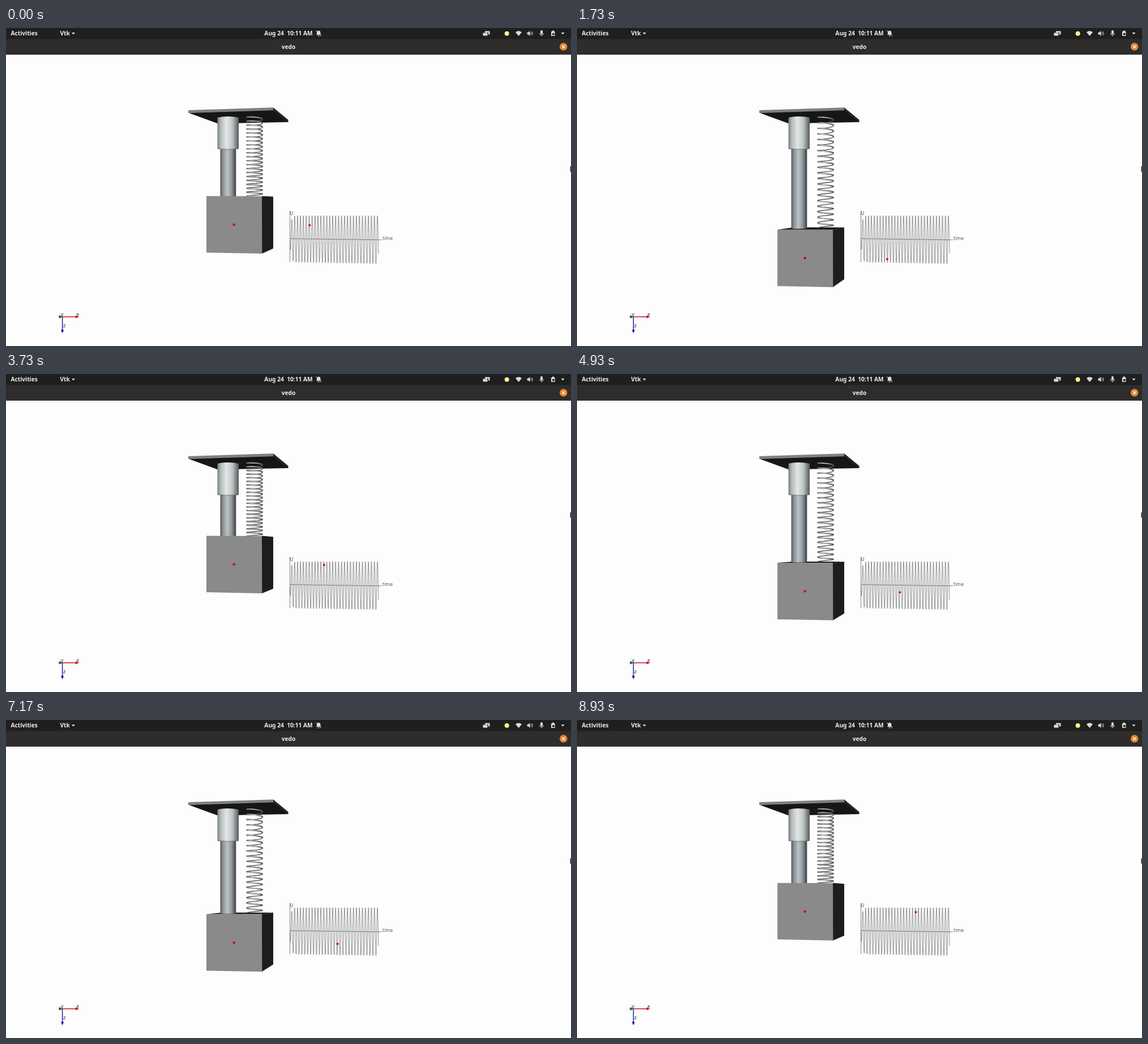
Recreate the animation shown at these times as an HTML page. Size 998 px wide and 561 px high, loop 8.96 s.

```html
<!DOCTYPE html>
<html lang="en">
<head>
<meta charset="utf-8">
<title>Spring and damper</title>
<style>
html, body { margin: 0; width: 100%; height: 100%; overflow: hidden; background: #fdfdfd; }
svg { display: block; width: 998px; height: 561px; }
.bar { font: 600 10.2px "Noto Sans", "Open Sans", sans-serif; fill: #eee; }
.label { font: 8px "DejaVu Sans", sans-serif; fill: #555; }
.axis { fill: none; stroke: #777; stroke-width: .9; }
</style>
</head>
<body>
<svg viewBox="0 0 998 561">
  <defs>
    <linearGradient id="sleeve">
      <stop offset="0" stop-color="#777c7d"/><stop offset=".15" stop-color="#b4babb"/>
      <stop offset=".42" stop-color="#e1e6e6"/><stop offset=".7" stop-color="#bfc4c5"/>
      <stop offset="1" stop-color="#55585a"/>
    </linearGradient>
    <linearGradient id="rod">
      <stop offset="0" stop-color="#505456"/><stop offset=".15" stop-color="#878d90"/>
      <stop offset=".45" stop-color="#bcc3c7"/><stop offset=".7" stop-color="#949a9e"/>
      <stop offset="1" stop-color="#3d4042"/>
    </linearGradient>
    <linearGradient id="wire" gradientUnits="userSpaceOnUse" x1="424" x2="454">
      <stop offset="0" stop-color="#777"/><stop offset=".35" stop-color="#d9dddf"/>
      <stop offset=".7" stop-color="#a5a9ab"/><stop offset="1" stop-color="#444"/>
    </linearGradient>
  </defs>

  <rect width="998" height="561" fill="#fdfdfd"/>
  <rect width="998" height="47" fill="#2e2d2c"/>
  <rect width="998" height="19.5" fill="#1f1f1f"/>

  <g class="bar">
    <text x="8.5" y="13">Activities</text>
    <text x="95.5" y="13">Vtk</text>
    <text x="499" y="13" text-anchor="middle">Aug 24&#160; 10:11 AM</text>
    <text x="499" y="36.5" text-anchor="middle">vedo</text>
  </g>

  <!-- panel icons -->
  <g fill="#ddd">
    <path d="M116 8h6l-3 3.6zM980.500 8h6l-3 3.600z"/>
    <path d="M548 12c1-1 1-2 1-4a3.200 3.200 0 0 1 6.400 0c0 2 0 3 1 4zM550.700 13h3a1.500 1.500 0 0 1-3 0z"/>
    <path d="M846 5.500h8.500v6H852V8h-6zM842.500 8.500h8v5h-8z"/>
    <path d="M900 7.500q5.500-4.500 11 0l-5.500 6.500z"/>
    <path d="M920.500 7.700h2l3-2.700v9l-3-2.700h-2z"/>
    <rect x="944" y="4" width="4" height="7" rx="2"/>
    <path d="M964 6h1V4.500h3V6h1.500v8H963V6z"/>
  </g>
  <g fill="none" stroke="#ddd">
    <path d="M927 7.500q1.500 2 0 4M929 6q2.700 3.500 0 7M942.500 9q0 3.500 3.500 3.500t3.500-3.500M946 12.500v2"/>
    <path d="M547 4.500l10.500 10"/>
  </g>
  <path d="M965 9h3.500v3.500H965z" fill="#1f1f1f"/>
  <circle cx="884.700" cy="9.700" r="4" fill="#f7f29a"/>
  <circle cx="984.700" cy="33" r="6.800" fill="#e58531"/>
  <path d="M982.200 30.500l5 5m0-5l-5 5" stroke="#fff" stroke-width="1.400"/>
  <path d="M998 243.500l-1.500 1v9h1.500z" fill="#333"/>

  <!-- ceiling plate -->
  <path d="M322 149.500L472 144.500 499 166 374 168.500z" fill="#161616"/>
  <path d="M472 140.300L498.500 162V166.300L472 145.300z" fill="#252525"/>
  <path d="M322 145L472 140.300V145.300L322 150z" fill="#808080"/>

  <path id="top" fill="#151515"/>
  <path id="piston" fill="url(#rod)"/>
  <path d="M373.500 158q18.700-4 37.500 0V213q-18.700 3-37.500 0z" fill="url(#sleeve)"/>
  <path d="M373.500 212.800q18.700 3 37.500 0" fill="none" stroke="#555" stroke-width=".8"/>

  <g fill="none">
    <path id="back" stroke="#555" stroke-width="1.400"/>
    <path id="edge" stroke="#4a4a4a" stroke-width="2.200"/>
    <path id="front" stroke="url(#wire)" stroke-width="1.300"/>
  </g>

  <path id="side" fill="#1d1d1d"/>
  <path id="face" fill="#8a8a8a"/>
  <rect id="mark" x="400.600" width="4" height="4" rx="1" fill="#d60010"/>

  <!-- graph -->
  <path class="axis" d="M501.500 323V413M501.500 371.600L664 373.800"/>
  <path id="curve" fill="none" stroke="#555" stroke-width=".65"/>
  <text class="label" x="501.500" y="330">U</text>
  <text class="label" x="665" y="374">time</text>
  <rect id="dot" width="3.800" height="3.400" rx="1" fill="#d60010"/>

  <!-- orientation axes -->
  <path d="M96 509.500H124" stroke="#c00018" stroke-width="1.400"/>
  <path d="M123 507L129 509.500 123 512z" fill="#c00018"/>
  <path d="M99.600 510V533" stroke="#1010b0" stroke-width="1.400"/>
  <path d="M97 532.500H102.200L99.600 538.500z" fill="#1010b0"/>
  <circle cx="95.400" cy="509.500" r="2.400" fill="#0a7a1e"/>
  <g class="label" style="fill:#222">
    <text x="96.800" y="507.500">y</text><text x="124.300" y="507.500">x</text><text x="101" y="528">z</text>
  </g>
</svg>

<script>
const LOOP = 8960, FRAME = 100 / 3, TAU = 2 * Math.PI;
const COILS = 20, SPRING_TOP = 157.5;

// [time in ms, oscillation count]; count 0 is a lowest position
const knots = [[0, -3.35], [930, -2.148], [2530, -.035], [4930, 3.197],
               [6270, 4.89], [8070, 7.44], [8930, 8.595]];

const $ = id => document.getElementById(id);
const setPath = (id, d) => $(id).setAttribute('d', d);
const poly = points => 'M' + points.map(p => p.map(v => v.toFixed(2)).join(' ')).join('L');

function cyclesAt(t) {
  let i = 1;
  while (i < knots.length - 1 && t > knots[i][0]) i++;
  const [t0, c0] = knots[i - 1], [t1, c1] = knots[i];
  return c0 + (c1 - c0) * (t - t0) / (t1 - t0);
}

function graphPoint(c) {
  const x = 553.6 + 5.18 * c + .004 * c * c, dx = x - 501;
  const growth = 1 - Math.exp(-2.6 * (c + 10.2));
  return [x, 372 + .009 * dx + (41 + .008 * dx) * growth * Math.cos(TAU * c)];
}

function drawSpring(end) {
  const halves = ['', ''], steps = 10;
  for (let h = 0; h < COILS * 2; h++) {
    const points = [];
    for (let i = 0; i <= steps; i++) {
      const turn = (h + i / steps) / 2, a = TAU * turn;
      const y = SPRING_TOP + (end - SPRING_TOP) * turn / COILS;
      points.push([439 - 14.3 * Math.cos(a), y - (308 - y) * .014 * Math.sin(a)]);
    }
    halves[h % 2] += poly(points);
  }
  setPath('edge', halves[0]);
  setPath('front', halves[0]);
  setPath('back', halves[1]);
}

function draw(t) {
  const c = cyclesAt(t), y = 371 + 41 * Math.cos(TAU * c);
  const near = y - 50.3, far = 297.5 + (y - 347) * .92, seat = (near + far) / 2;

  setPath('top', far < near ? poly([[354, near], [382, far], [472, far], [452, near]]) + 'z' : '');
  setPath('piston', `M378.500 212H406.300V${seat}q-14 1-27.800 0z`);
  drawSpring(seat - .5);
  setPath('side', poly([[452, near], [472, far], [472, far + 91.5], [452, y + 51.2]]) + 'z');
  setPath('face', poly([[354, near], [452, near + .2], [452.3, y + 51.2], [354, y + 49.3]]) + 'z');
  $('mark').setAttribute('y', y - 2);

  const [gx, gy] = graphPoint(c);
  $('dot').setAttribute('x', gx - 1.9);
  $('dot').setAttribute('y', gy - 1.7);
}

const trace = [];
for (let c = -10.15; c <= 19.88; c += .05) trace.push(graphPoint(c));
setPath('curve', poly(trace));

const start = performance.now();
function tick() {
  const t = Math.max(0, performance.now() - start) % LOOP;
  draw(Math.floor((t + 4) / FRAME) * FRAME);
  requestAnimationFrame(tick);
}
tick();
</script>
</body>
</html>
```
